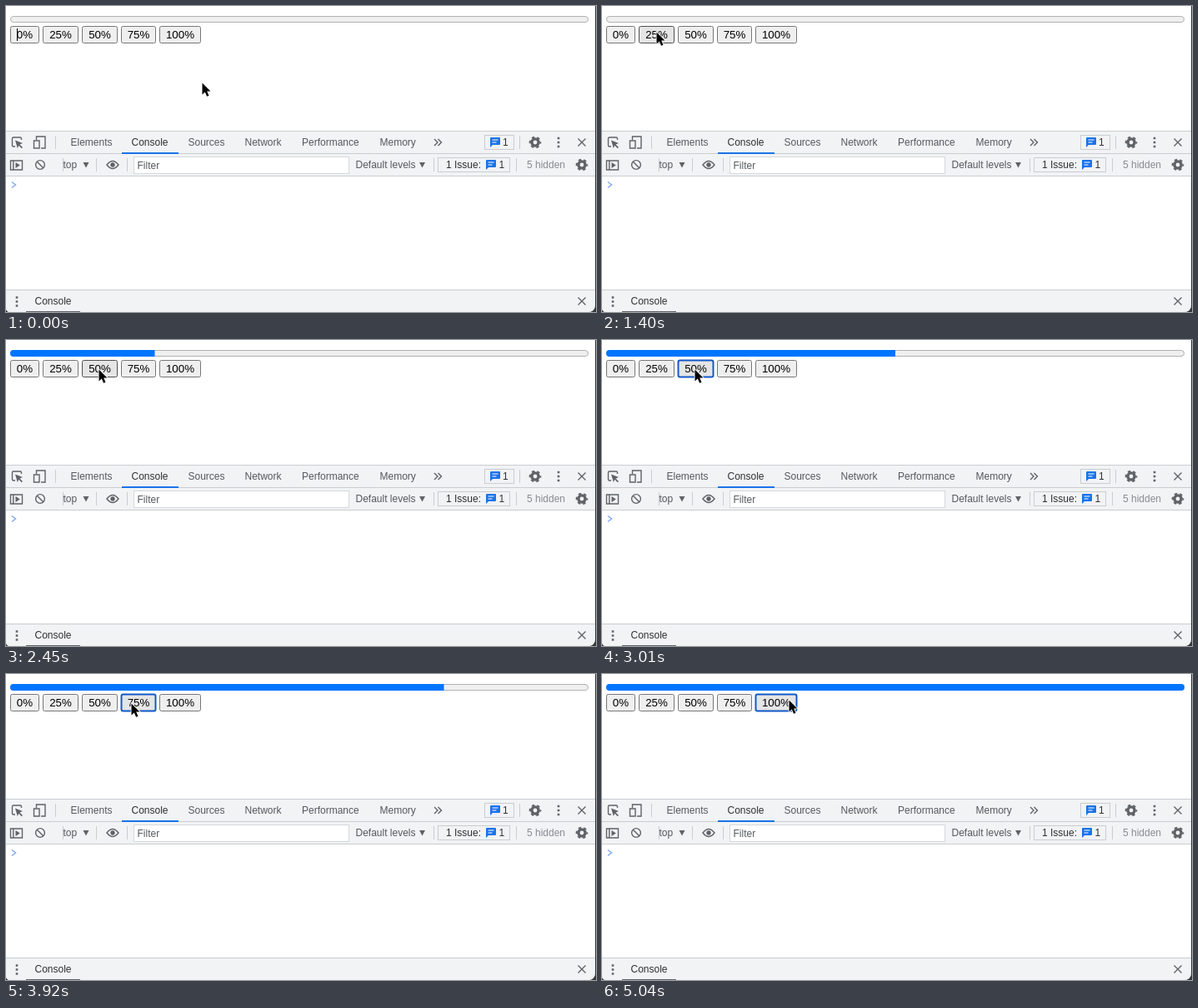
Recreate the animation shown at these times as an HTML page. Size 708 by 368 pixels, loop 5.11 s.

```html
<!DOCTYPE html>
<html lang="en">
<head>
<meta charset="utf-8">
<title>Progress bar</title>
<style>
  html, body { margin: 0; width: 100%; height: 100%; overflow: hidden; background: #34383b; }
  svg { display: block; font: 12px "Liberation Sans", Arial, sans-serif; }
  .line { stroke: #cacdd1; fill: none; }
  .icon { stroke: #5f6368; fill: none; stroke-width: 1.4; }
  .solid { fill: #5f6368; }
  .label { fill: #55595e; }
  .dark { fill: #303134; }
  .box { fill: #f1f3f4; stroke: #cacdd1; }
  .button rect { fill: #efefef; stroke: #767676; }
  .button text { font-size: 13.333px; text-anchor: middle; }
  .button.hover rect { fill: #e5e5e5; stroke: #4f4f4f; }
  .button.ring rect { stroke: #1259c8; stroke-width: 2; }
</style>
</head>
<body>
<svg width="708" height="368" viewBox="0 0 708 368">
  <defs>
    <clipPath id="window"><path d="M0 0H707V359Q707 368 698 368H5Q0 368 0 363Z"/></clipPath>
    <clipPath id="track"><rect x="5" y="12" width="694" height="8" rx="4"/></clipPath>
    <g id="gear">
      <circle r="4.1" fill="none" stroke="#5f6368" stroke-width="3.4"/>
      <circle r="6.3" fill="none" stroke="#5f6368" stroke-width="2" stroke-dasharray="3.3 3.3" stroke-dashoffset="1.65"/>
    </g>
    <path id="dots" class="solid" d="M-1.3-6.3h2.6v2.6h-2.6zM-1.3-1.3h2.6v2.6h-2.6zM-1.3 3.7h2.6v2.6h-2.6z"/>
    <path id="cross" class="icon" d="M-4.5-4.5 4.5 4.5M4.5-4.5-4.5 4.5"/>
    <path id="down" class="solid" d="M-3.5-3h7L0 3.5Z"/>
    <g id="chat">
      <path d="M1 0H11Q12 0 12 1V8Q12 9 11 9H3L0 12V1Q0 0 1 0Z" fill="#1a73e8"/>
      <path d="M2.5 3H9.5M2.5 6H7.5" stroke="#fff" stroke-width="1.2"/>
    </g>
  </defs>
  <g clip-path="url(#window)">
    <path fill="#fff" d="M0 0H708V368H0Z"/>

    <rect x="5.5" y="12.5" width="693" height="7" rx="3.5" fill="#efefef" stroke="#b2b2b2"/>
    <rect id="fill" clip-path="url(#track)" x="5" y="12" height="8" fill="#0075ff"/>
    <g id="buttons"></g>

    <path fill="#f1f3f4" d="M0 150H708V205H0ZM0 341H708V368H0Z"/>
    <path class="line" d="M0 150.5H708M0 177.5H708M0 204.5H708M0 341.5H708M59.5 156V172M616.5 156V172M68.5 183V199M108.5 183V199M145.5 183V199M513.5 183V199M612.5 183V199"/>
    <path fill="#1a73e8" d="M139 176H207V178H139Z"/>
    <path fill="#5f6368" d="M24 367H89V368H24Z"/>

    <!-- tab row -->
    <path class="icon" d="M11 169H9Q7.500 169 7.500 167.500V159.500Q7.500 158 9 158H17Q18.500 158 18.500 159.500V161"/>
    <path class="solid" d="M11 161.500 20 165 16.500 166.500 20 170 18.800 171.200 15.300 167.700 13.800 171Z"/>
    <path class="icon" d="M36.500 161V157H47V171H42M33.500 162H40V171H33.500Z"/>
    <g class="label">
      <text x="77.500" y="168">Elements</text>
      <text x="150.500" y="168" class="dark">Console</text>
      <text x="218.500" y="168">Sources</text>
      <text x="286.500" y="168">Network</text>
      <text x="355" y="168">Performance</text>
      <text x="448.500" y="168">Memory</text>
    </g>
    <path class="icon" d="M514 160 518 164 514 168M518.500 160 522.500 164 518.500 168"/>
    <rect class="box" x="574.5" y="155.5" width="35" height="17"/>
    <use href="#chat" x="581" y="158"/>
    <text x="596" y="168" class="dark">1</text>
    <use href="#gear" x="635" y="164"/>
    <use href="#dots" x="663" y="164"/>
    <use href="#cross" x="691" y="164"/>

    <!-- filter row -->
    <path class="icon" d="M5.500 186H19.500V197H5.500ZM8.800 186V197"/>
    <path class="solid" d="M11.500 188 16.800 191.500 11.500 195Z"/>
    <path class="icon" d="M37.500 187.500 45 195"/>
    <circle class="icon" cx="41" cy="191" r="5.4"/>
    <text x="68.500" y="195" class="label">top</text>
    <use href="#down" x="96" y="191"/>
    <path class="icon" d="M121 191Q128 182 135 191Q128 200 121 191Z"/>
    <circle class="solid" cx="128" cy="191" r="2.7"/>
    <rect x="153.500" y="181.500" width="258" height="20" fill="#fff" stroke="#d5d8dc"/>
    <text x="157.500" y="196" class="label">Filter</text>
    <text x="419.500" y="195" class="label">Default levels</text>
    <use href="#down" x="499.500" y="191"/>
    <rect class="box" x="518.5" y="182.5" width="86" height="17"/>
    <text x="528" y="195" class="dark">1 Issue:</text>
    <use href="#chat" x="576" y="185"/>
    <text x="591.500" y="195" class="dark">1</text>
    <text x="625" y="195" fill="#888c91">5 hidden</text>
    <use href="#gear" x="691" y="191"/>

    <path d="M7 211.500 11.500 215 7 218.500" fill="none" stroke="#80aaf0" stroke-width="1.5"/>
    <use href="#dots" x="13" y="355.500"/>
    <text x="34.500" y="359" class="dark">Console</text>
    <use href="#cross" x="691" y="355"/>

    <path id="caret" d="M13.500 27V42" stroke="#000"/>
    <path id="cursor" d="M.5 .5V14.500L3.800 11.400 6.100 16.700 8.500 15.700 6.200 10.500H10.500Z" stroke="#fff" stroke-width="1.6" paint-order="stroke"/>
  </g>
</svg>
<script>
const LOOP = 5110, STEP = 70, RING = 350;
const $ = id => document.getElementById(id);

// left edge, width, value, click time
const buttons = [
  [5, 35, 0, 910], [44, 43, 25, 1680], [91, 43, 50, 2940],
  [138, 42, 75, 3850], [184, 50, 100, 5040]
].map(([x, w, value, click]) => ({ x, w, value, click }));

// time, x, y of the pointer tip
const path = [
  [0, 235, 92], [630, 45, 30], [770, 24, 33], [1050, 24, 33],
  [1330, 65, 31], [1820, 65, 31], [2170, 111, 35], [3080, 111, 35],
  [3360, 150, 35], [3950, 150, 35], [4200, 224, 31], [LOOP, 224, 31]
];

$('buttons').innerHTML = buttons.map(b =>
  `<g class="button"><rect x="${b.x + .5}" y="24.5" width="${b.w - 1}" height="20" rx="2"/>
   <text x="${b.x + b.w / 2}" y="39">${b.value}%</text></g>`).join('');
const nodes = [...$('buttons').children];

function pointer(t) {
  const i = path.findIndex(p => p[0] > t);
  const [t0, x0, y0] = path[i - 1], [t1, x1, y1] = path[i];
  const u = (t - t0) / (t1 - t0), e = u * u * (3 - 2 * u);
  return [x0 + (x1 - x0) * e, y0 + (y1 - y0) * e];
}

function draw(now) {
  const t = Math.floor(now % LOOP / STEP) * STEP;
  const [x, y] = pointer(t);
  let value = 0;
  buttons.forEach((b, i) => {
    if (t >= b.click) value = b.value;
    const hover = x >= b.x && x < b.x + b.w && y >= 24 && y < 45;
    nodes[i].classList.toggle('hover', hover);
    nodes[i].classList.toggle('ring', hover && t >= b.click && t < b.click + RING);
  });
  $('fill').setAttribute('width', 694 * value / 100);
  $('cursor').setAttribute('transform', `translate(${Math.round(x)} ${Math.round(y)})`);
  $('caret').style.display = t < STEP ? '' : 'none';
  requestAnimationFrame(draw);
}
draw(0);
</script>
</body>
</html>
```
